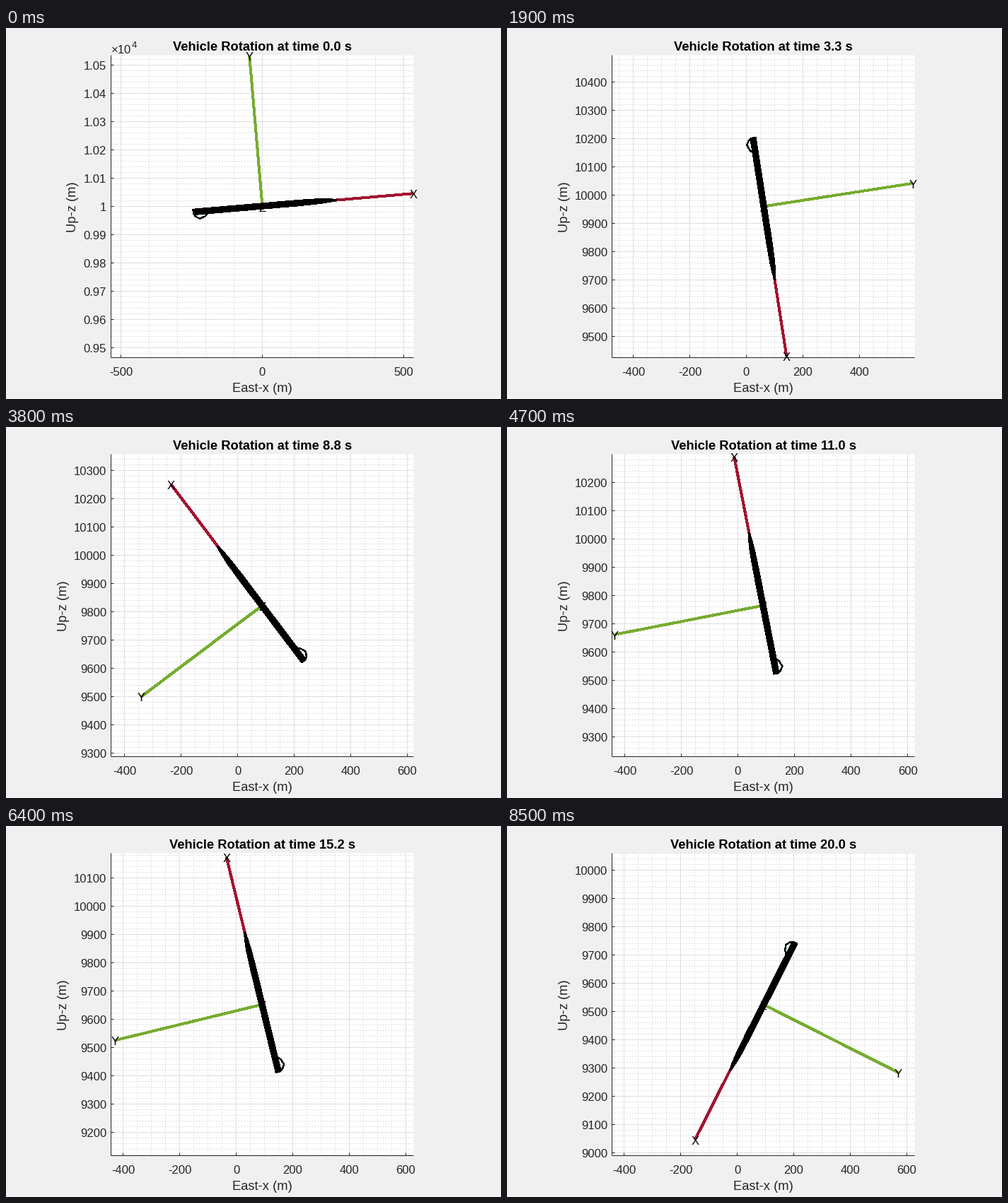
Write a matplotlib script that moves like this. It is 700x525 px and loops after 8.6 s.

```python
import numpy as np
import matplotlib.pyplot as plt
from matplotlib.animation import FuncAnimation
from matplotlib.collections import LineCollection

plt.rcParams["font.family"] = "Liberation Sans"

W, H, DPI = 700, 525, 100
FRAMES, INTERVAL = 86, 100
PX = 72 / DPI                      # points per pixel
LEFT, RIGHT, TOP, BOTTOM = 148.5, 576.5, 38.5, 466.5
CX, CY = (LEFT + RIGHT) / 2, (TOP + BOTTOM) / 2
SCALE = 0.4                        # pixels per metre
HALF = (RIGHT - LEFT) / 2 / SCALE  # half span of the view in metres
ARM = 214.2
TICK_SIZE, LABEL_SIZE = 12, 13.2

RED, GREEN, INK = "#a2142f", "#77ac30", "#262626"

# Solver samples: held frames, then step number against time and pitch.
HOLDS = (3, 35, 44, 52, 61, 69, 78)
STEPS = [0, 2, 7, 11, 12, 13, 14, 18, 22, 36, 44, 59, 69, 78]
TIMES = [0, 0, 0.015, 0.045, 0.25, 0.7, 1.2, 3.3, 4.8, 8.8, 11.0, 15.2, 17.8, 20.0]
SPIN_STEPS = [18, 36, 44, 59, 69, 78]
SPIN = [-81.2, -953.0, -1338.9, -2056.3, -2579.7, -2996.8]

# Vehicle side view in pixels: nose along +u, fin below the tail.
HULL_U = np.array([-98, 0, 50, 80, 95, 105])
HULL_TOP = np.array([4, 4, 4, 3.4, 2, 0.6])
HULL_LOW = np.array([-3, -3, -3, -2.4, -1.4, 0.2])
FIN = np.array([(-97, -3), (-95.5, -6), (-89.5, -9.8), (-82, -7), (-76, -2)])


def state(frame):
    """Time, position and pitch of the vehicle for one frame."""
    step = frame - sum(h <= frame for h in HOLDS)
    t = np.interp(step, STEPS, TIMES)
    if step < SPIN_STEPS[0]:
        pitch = 4.9 - 2.396 * t ** 3
    else:
        pitch = np.interp(step, SPIN_STEPS, SPIN)
    x = 92 * (1 - np.exp(-t / 3.03))
    z = 10000 - 81.1 * np.log(np.cosh(0.3275 * t))
    return t, x, z, np.radians(pitch)


def multiples(center, gap):
    first = np.ceil((center - HALF) / gap)
    last = np.floor((center + HALF) / gap)
    return np.arange(first, last + 1) * gap


def snap(v):
    return np.floor(v) + 0.5


def to_px(u, v, pitch):
    c, s = np.cos(pitch), np.sin(pitch)
    return CX + u * c - v * s, CY - u * s - v * c


def label(x, y, text, size=TICK_SIZE, color=INK, ha="center", **kw):
    ax.text(x, y, text, fontsize=size, color=color, ha=ha, va="baseline", **kw)


def lines(segments, color, width=1, style="solid", z=1, smooth=True):
    ax.add_collection(LineCollection(segments, colors=color, linewidths=width * PX,
                                     linestyles=style, zorder=z, snap=False,
                                     antialiaseds=smooth))


def draw_axes(x, z, t, first):
    ax.fill([LEFT, RIGHT, RIGHT, LEFT], [TOP, TOP, BOTTOM, BOTTOM],
            color="white", lw=0, snap=False)
    x_gap, x_minor = (500, 100) if first else (200, 50)

    def col(m):
        return snap(CX + (m - x) * SCALE)

    def row(m):
        return snap(CY - (m - z) * SCALE)

    def upright(values):
        return [[(col(m), BOTTOM), (col(m), TOP)] for m in values]

    def level(values):
        return [[(LEFT, row(m)), (RIGHT, row(m))] for m in values]

    minor = upright(m for m in multiples(x, x_minor) if m % x_gap)
    minor += level(m for m in multiples(z, 20) if m % 100)
    lines(minor, "#dcdcdc", style=(0, (2, 2)))

    xs, zs = multiples(x, x_gap), multiples(z, 100)
    lines(upright(xs) + level(zs), "#dedede", z=2)

    edge = [[(LEFT, TOP), (LEFT, BOTTOM)], [(LEFT, BOTTOM), (RIGHT, BOTTOM)]]
    edge += [[(col(m), BOTTOM), (col(m), BOTTOM - 4)] for m in xs]
    edge += [[(LEFT, row(m)), (LEFT + 4, row(m))] for m in zs]
    lines(edge, INK, z=3)

    for m in xs:
        label(col(m), 491.5, f"{m:.0f}")
    for m in zs:
        text = f"{m / 1e4:g}" if first else f"{m:.0f}"
        label(142, row(m) + 6.2, text, ha="right")
    if first:
        label(149, 36, "×10", ha="left")
        label(178, 27.5, "4", size=9.6, ha="left")

    label(CX, 515, "East-x (m)", LABEL_SIZE)
    label(99 if first else 86, CY + 0.5, "Up-z (m)", LABEL_SIZE,
          rotation=90, rotation_mode="anchor")
    label(CX, 32, f"Vehicle Rotation at time {t:.1f} s", LABEL_SIZE, "black",
          weight="bold")


def draw_hull(pitch):
    """Wire mesh of ribs and stringers over a pale skin."""
    def run(share):
        v = HULL_LOW + share * (HULL_TOP - HULL_LOW)
        return np.column_stack(to_px(HULL_U, v, pitch))

    top, low = run(1), run(0)
    ax.fill(*np.vstack([top, low[::-1]]).T, color="#c9d6dc", lw=0, zorder=5)

    ribs = np.arange(HULL_U[0], HULL_U[-1], 2.6)
    upper = to_px(ribs, np.interp(ribs, HULL_U, HULL_TOP), pitch)
    lower = to_px(ribs, np.interp(ribs, HULL_U, HULL_LOW), pitch)
    mesh = [run(share) for share in np.linspace(0, 1, 5)]
    mesh += [[a, b] for a, b in zip(zip(*upper), zip(*lower))]
    lines(mesh, "black", 1.3, z=6, smooth=False)


def draw_vehicle(pitch):
    x_tip, y_tip = to_px(ARM, 0, pitch), to_px(0, ARM, pitch)
    for tip, color in ((x_tip, RED), (y_tip, GREEN)):
        lines([[(CX, CY), tip]], color, 3, z=4, smooth=False)

    ax.fill(*to_px(*FIN.T, pitch), facecolor="#dceef8", edgecolor="black",
            lw=1.2 * PX, zorder=5, antialiased=False)
    draw_hull(pitch)

    for name, (px, py) in (("X", x_tip), ("Y", y_tip), ("Z", (CX + 0.3, CY + 0.8))):
        label(px, py + 7, name, color="black", zorder=7)


def draw(frame):
    ax.clear()
    ax.set(xlim=(0, W), ylim=(H, 0))
    ax.axis("off")
    t, x, z, pitch = state(frame)
    draw_axes(x, z, t, frame == 0)
    draw_vehicle(pitch)
    return []


fig = plt.figure(figsize=(W / DPI, H / DPI), dpi=DPI, facecolor="#f0f0f0")
ax = fig.add_axes([0, 0, 1, 1])
anim = FuncAnimation(fig, draw, frames=FRAMES, interval=INTERVAL,
                     init_func=lambda: draw(0), repeat=True, repeat_delay=0)
plt.show()
```
